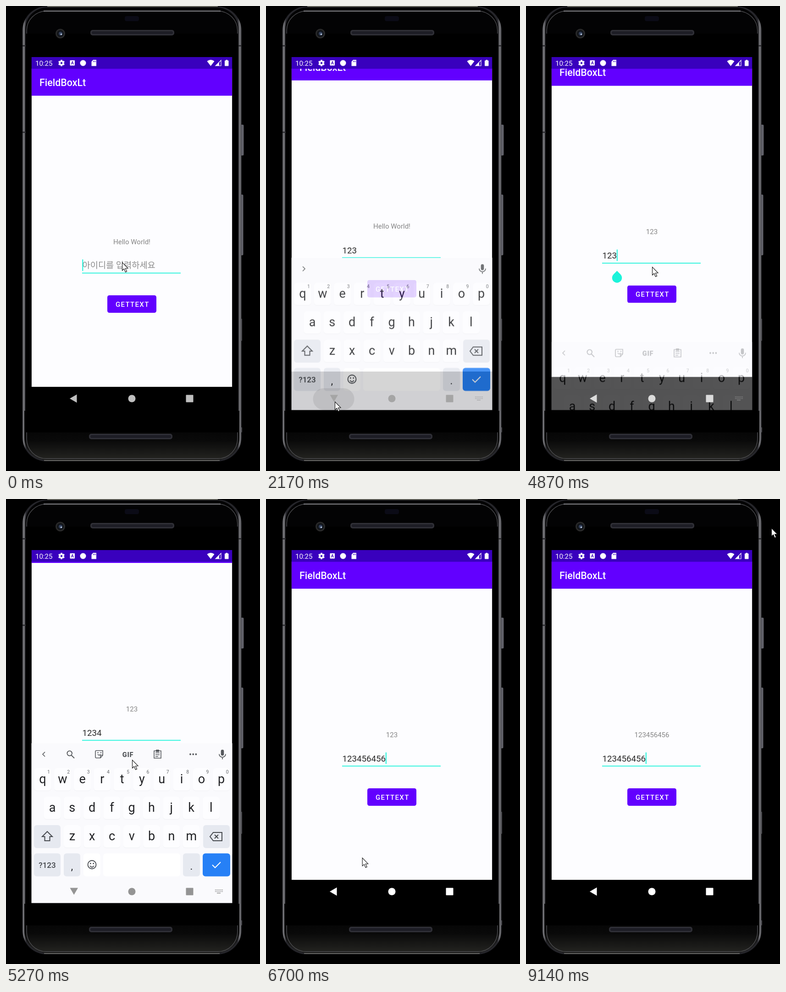
An HTML page with a canvas for the animation above (9.17 s loop, 554 by 1011 pixels).

```html
<!DOCTYPE html>
<html lang="ko">
<head>
<meta charset="utf-8">
<style>
html, body { margin: 0; height: 100%; overflow: hidden; background: #000; }
canvas { display: block; }
</style>
</head>
<body>
<canvas id="stage" width="554" height="1011"></canvas>
<script>
const LOOP = 9170;
const PURPLE = '#6200ff', TEAL = '#1cf3da', PAPER = '#fdfdff';
const FACE = 'Roboto, "Noto Sans CJK KR", "Noto Sans CJK", sans-serif';
const stage = document.getElementById('stage').getContext('2d');
let c = stage;

const clamp = v => Math.max(0, Math.min(1, v));
const smooth = v => v * v * (3 - 2 * v);

function rect(x, y, w, h, color, r = 0) {
  c.fillStyle = color;
  c.beginPath();
  c.roundRect(x, y, w, h, r);
  c.fill();
}
function disc(x, y, r, color) {
  c.fillStyle = color;
  c.beginPath();
  c.arc(x, y, r, 0, 7);
  c.fill();
}
function poly(points, fill, stroke, width = 1) {
  c.beginPath();
  for (let i = 0; i < points.length; i += 2) c.lineTo(points[i], points[i + 1]);
  c.closePath();
  if (fill) { c.fillStyle = fill; c.fill(); }
  if (stroke) { c.strokeStyle = stroke; c.lineWidth = width; c.stroke(); }
}
function line(d, color, width = 1.8) {
  c.strokeStyle = color;
  c.lineWidth = width;
  c.stroke(new Path2D(d));
}
function text(s, x, y, size, color, align = 'left', weight = 400, gap = 0) {
  c.font = `${weight} ${size}px ${FACE}`;
  c.letterSpacing = gap + 'px';
  c.textAlign = align;
  c.fillStyle = color;
  c.fillText(s, x, y);
}
function clipBox(x, y, w, h, r = 0) {
  c.save();
  c.beginPath();
  c.roundRect(x, y, w, h, r);
  c.clip();
}
function layer(draw) {
  const el = document.createElement('canvas');
  el.width = 554;
  el.height = 1011;
  c = el.getContext('2d');
  draw();
  c = stage;
  return el;
}
function shade(x0, y0, x1, y1, ...stops) {
  const g = c.createLinearGradient(x0, y0, x1, y1);
  stops.forEach(([at, color]) => g.addColorStop(at, color));
  return g;
}

function drawPhone() {
  rect(0, 0, 554, 1011, '#000');
  rect(510, 258, 8.5, 67, '#62626a', 2);
  rect(510, 410, 7.5, 132, '#62626a', 2);
  rect(510, 680, 5, 48, '#4c4c50', 1);
  rect(510, 916, 5, 11, '#4c4c50', 1);
  rect(36, 1, 477.5, 989, shade(36, 0, 513, 0,
    [0, '#55555a'], [.006, '#77777b'], [.017, '#25252a'],
    [.983, '#25252a'], [.994, '#77777b'], [1, '#4b4b50']), 52);
  rect(42, 3, 465, 984, '#030304', 48);
  clipBox(40, 5, 469, 981, 47);
  rect(40, 880, 469, 106, shade(0, 880, 0, 986, [0, '#000'], [.6, '#090909'], [1, '#242421']));
  c.restore();
  c.lineWidth = 1.5;
  c.strokeStyle = '#4a4a4d';
  c.beginPath();
  c.roundRect(45, 11, 460, 973, 43);
  c.stroke();
  line('M82 11H468', '#85858a', 2);
  line('M90 1H462', '#696960', 2);
  line('M83 988H466', '#676764', 2);
  for (const y of [85, 273]) rect(36, y, 7, 3, '#303034');
  rect(507, 85, 6, 3, '#303034');
  rect(43, 60, 463, 867, '#000');

  rect(259, 22, 31, 11, '#0b0b16', 4);
  disc(118.5, 60, 10.5, '#292929');
  disc(118.5, 60, 7.5, '#111419');
  disc(119, 60, 4, '#34405a');
  disc(120.5, 61.5, 1.8, '#b4c4db');
  for (const [x, y, w] of [[184, 52, 183], [181, 930, 182]]) {
    rect(x, y, w, 12, '#2f2f36', 5);
    rect(x + 3, y + 3, w - 6, 6, '#1d1d25', 3);
  }
}

function drawStatus() {
  rect(55.5, 111, 438, 25.5, '#3900bd');
  text('10:25', 64, 129.5, 15, '#fff');
  for (let i = 0; i < 6; i++) {
    c.save();
    c.translate(121, 124);
    c.rotate(i * Math.PI / 3);
    rect(-2, -7, 4, 4, '#fff', 1);
    c.restore();
  }
  disc(121, 124, 5.2, '#fff');
  disc(121, 124, 2.2, '#3900bd');
  rect(139.5, 118, 10.5, 11.5, '#fff', 1);
  text('A', 144.8, 127, 9, '#3900bd', 'center', 700);
  disc(168, 124, 6.5, '#fff');
  poly([190, 117, 197, 117, 197, 130.5, 186.5, 130.5, 186.5, 121], '#fff');
  for (let i = 0; i < 3; i++) rect(190 + i * 2.3, 119, 1, 3, '#3900bd');
  c.fillStyle = '#fff';
  c.fill(new Path2D('M438.5 120Q446.5 114 454.5 120L446.5 130.5Z'));
  poly([457, 130, 469, 118, 469, 130], null, '#fff', 1.2);
  poly([457, 130, 465, 122, 465, 130], '#fff');
  rect(477, 118.5, 8.5, 12, '#fff', 1);
  rect(479.5, 117, 3.5, 2, '#fff');
}

function drawStrip(expanded) {
  const ink = '#55585c';
  line(expanded ? 'M85 550l-5 5 5 5' : 'M80 550l5 5-5 5', ink, 1.6);
  rect(468.7, 545, 6.6, 13, ink, 3.3);
  line('M465 554.5a7 7 0 0 0 14 0M472 561.5v4.5', ink, 1.7);
  if (!expanded) return;
  line('M144 553a5.3 5.3 0 1 1-10.6 0a5.3 5.3 0 1 1 10.6 0M142.5 557l6.5 6.5', ink);
  line('M197 547h14v10l-5 6h-9q-2 0-2-2v-12q0-2 2-2M211 557h-5v6M200 555q3 4 6 0', ink, 1.6);
  disc(200.5, 551.5, 1.2, ink);
  disc(207, 551.5, 1.2, ink);
  text('GIF', 266, 560.5, 14.5, ink, 'center', 900, .8);
  line('M323 547.5h15v16h-15ZM326 552h9M326 556h9M326 560h6', ink, 1.6);
  rect(327, 545, 7, 5, ink, 1);
  for (let i = 0; i < 3; i++) disc(402 + i * 6.2, 555, 1.9, ink);
}

function drawKeyboard(expanded) {
  const ink = '#202124', side = '#e6e9f0';
  rect(55, 531, 439, 480, '#fafafd');
  drawStrip(expanded);
  [['qwertyuiop', 80, 618], ['asdfghjkl', 101, 680], ['zxcvbnm', 144.5, 742]].forEach(([keys, x0, base], row) => {
    [...keys].forEach((key, i) => {
      const x = x0 + i * 43.3;
      rect(x - 18.5, base - 33, 37, 50, '#f0f1f4', 6);
      rect(x - 18.5, base - 33, 37, 49, '#fdfdff', 6);
      text(key, x, base, 27, ink, 'center');
      if (!row) text((i + 1) % 10, x + 13, base - 21, 10.5, '#63666a', 'center');
    });
  });
  for (const [x, y, w, color] of [
    [61, 709, 58, side], [430, 709, 58, side], [61, 770.5, 58, side], [126, 770.5, 36, side],
    [169, 770.5, 37, '#fff'], [212, 770.5, 168, '#fff'], [386, 770.5, 37, side], [429, 770.5, 60, '#2680f6']
  ]) rect(x, y, w, 50, color, 6);
  line('M90 723l11 11h-5.5v9h-11v-9h-5.5Z', '#484b50', 2);
  line('M452 725h19v18h-19l-7-9ZM455 730l8 8M463 730l-8 8', '#484b50', 2);
  text('?123', 90, 801.5, 17, '#44474c', 'center', 500);
  text(',', 144, 806, 22, ink, 'center');
  text('.', 404.5, 806, 22, ink, 'center');
  line('M196.5 795a9 9 0 1 1-18 0a9 9 0 1 1 18 0M183 797.5q4.500 6 9 0', '#44474c');
  disc(184.3, 792.5, 1.4, '#44474c');
  disc(190.7, 792.5, 1.4, '#44474c');
  line('M450 795.500l6 6 12-12', '#fff', 2);
}

const phone = layer(drawPhone);
const boards = [layer(() => drawKeyboard(false)), layer(() => drawKeyboard(true))];

const KEYS = [[1000, '1'], [1200, '2'], [1400, '3'],
  [5250, '4'], [5340, '5'], [5430, '6'], [5520, '4'], [5610, '5'], [5700, '6']];
const OPENS = [40, 4815], CLOSES = [2078, 6340];
const NAV_TAPS = [2020, 6280];
const TAPS = [[2930, 268], [7300, 302]];
// time, x, y of the pointer's tip
const PATH = [[0, 253, 557], [1450, 253, 557], [1770, 150, 860], [2200, 150, 860],
  [2850, 267, 653], [4320, 267, 653], [4700, 275, 567], [5700, 275, 567],
  [6130, 163, 849], [6460, 163, 849], [7080, 302, 643], [8040, 302, 643], [8930, 535, 63], [LOOP, 535, 63]];

// lift: how far the app is pushed up; drop: keyboard offset; alpha: its opacity
function keyboardAt(t) {
  const i = t < OPENS[1] ? 0 : 1;
  if (t < OPENS[i]) return { lift: 0, drop: 324, alpha: 0 };
  if (t < CLOSES[i]) {
    const p = 1 - (1 - clamp((t - OPENS[i]) / 260)) ** 2;
    return { lift: 56 * p, drop: 324 * (1 - p), alpha: p < 1 ? p * .86 + .14 * p ** 4 : 1 };
  }
  const u = clamp((t - CLOSES[i]) / 230);
  return { lift: 56 * (1 - u), drop: 324 * u ** 3.3, alpha: 1 - u * u };
}

function caretOn(t) {
  const start = t >= 5700 ? 5700 : t >= 1400 ? 1400 : t >= 1000 ? 1000 : 0;
  return (t - start) % 1000 < 500;
}

function drawButton(t) {
  clipBox(221, 629, 107, 38, 4.5);
  rect(221, 629, 107, 38, PURPLE);
  for (const [start, x] of TAPS) {
    const dt = t - start;
    if (dt < 0 || dt > 480) continue;
    const a = Math.min(.24, dt / 700) * clamp((480 - dt) / 230);
    disc(x, 648, dt * .37, `rgba(255,255,255,${a})`);
  }
  c.restore();
  text('GETTEXT', 239, 654, 15, '#fff', 'left', 500, 1.34);
}

function drawApp(t, lift) {
  clipBox(55.5, 136, 438, 692);
  c.translate(0, -lift);
  rect(55.5, 136, 438, 692, PAPER);
  rect(55.5, 136, 438, 59, PURPLE);
  text('FieldBoxLt', 73, 174, 21.4, '#fff', 'left', 500);
  const label = t < 3090 ? 'Hello World!' : t < 7540 ? '123' : '123456456';
  text(label, 274.5, 517.5, 15, '#858585', 'center');
  const typed = KEYS.filter(k => t >= k[0]).map(k => k[1]).join('');
  if (typed) text(typed, 166.5, 571, 18.7, '#292929');
  else text('아이디를 입력하세요', 166.5, 570, 18.7, '#8c8c8c', 'left', 300);
  rect(166, 579.7, 215, 1.8, TEAL);
  if (caretOn(t)) rect(166.3 + typed.length * 10.5, 551, 2, 25, TEAL);
  drawButton(t);
  if (t > 4780 && t < 5250) {
    disc(198.5, 612.5, 10.7, TEAL);
    poly([198.5, 597.4, 206.1, 605, 198.5, 612.5, 190.9, 605], TEAL);
  }
  c.restore();
}

function drawNav(t, alpha) {
  const mix = Math.max(alpha, t < 200 ? .6 : 0);
  const v = Math.round(255 - mix * 107);
  const color = `rgb(${v},${v},${v})`;
  for (const start of NAV_TAPS) {
    const dt = t - start;
    if (dt < 0 || dt > 420) continue;
    const w = 90 * clamp(dt / 130);
    rect(147.5 - w / 2, 831, w, 47, `rgba(110,110,110,${.17 * clamp((420 - dt) / 200)})`, Math.min(23.5, w / 2));
  }
  poly(alpha > .6 ? [139.5, 845.5, 157, 845.5, 148.2, 860.5] : [139, 853.5, 154.5, 844.5, 154.5, 862.5], color);
  disc(274.5, 853.5, 8, color);
  rect(392.5, 845.500, 16, 16, color, 1);
  if (!alpha) return;
  c.globalAlpha = alpha;
  for (let row = 0; row < 2; row++)
    for (let i = 0; i < 6; i++) rect(456 + i * 3, 849 + row * 3.4, 1.8, 1.8, color);
  rect(460, 856, 8, 1.6, color);
  c.globalAlpha = 1;
}

function drawPointer(t) {
  const i = PATH.findIndex(p => p[0] > t) - 1;
  const [t0, x0, y0] = PATH[i], [t1, x1, y1] = PATH[i + 1];
  const k = smooth((t - t0) / (t1 - t0));
  c.save();
  c.translate(x0 + (x1 - x0) * k, y0 + (y1 - y0) * k);
  poly([.5, .5, .5, 18, 4.5, 14.5, 7.5, 21.5, 10.5, 20.2, 7.5, 13.5, 13, 13.3], '#fff', '#111', 1.1);
  c.restore();
}

function frame(now) {
  const t = now % LOOP;
  const { lift, drop, alpha } = keyboardAt(t);
  c.drawImage(phone, 0, 0);
  clipBox(55.5, 111, 438, 767.5);
  drawApp(t, lift);
  if (alpha > 0) {
    c.globalAlpha = alpha;
    c.drawImage(boards[t < 1000 || t > 4000 ? 1 : 0], 0, drop);
    c.globalAlpha = 1;
  }
  drawStatus();
  drawNav(t, alpha);
  c.restore();
  drawPointer(t);
}

const began = performance.now();
function tick() {
  frame(performance.now() - began);
  requestAnimationFrame(tick);
}
tick();
</script>
</body>
</html>
```
